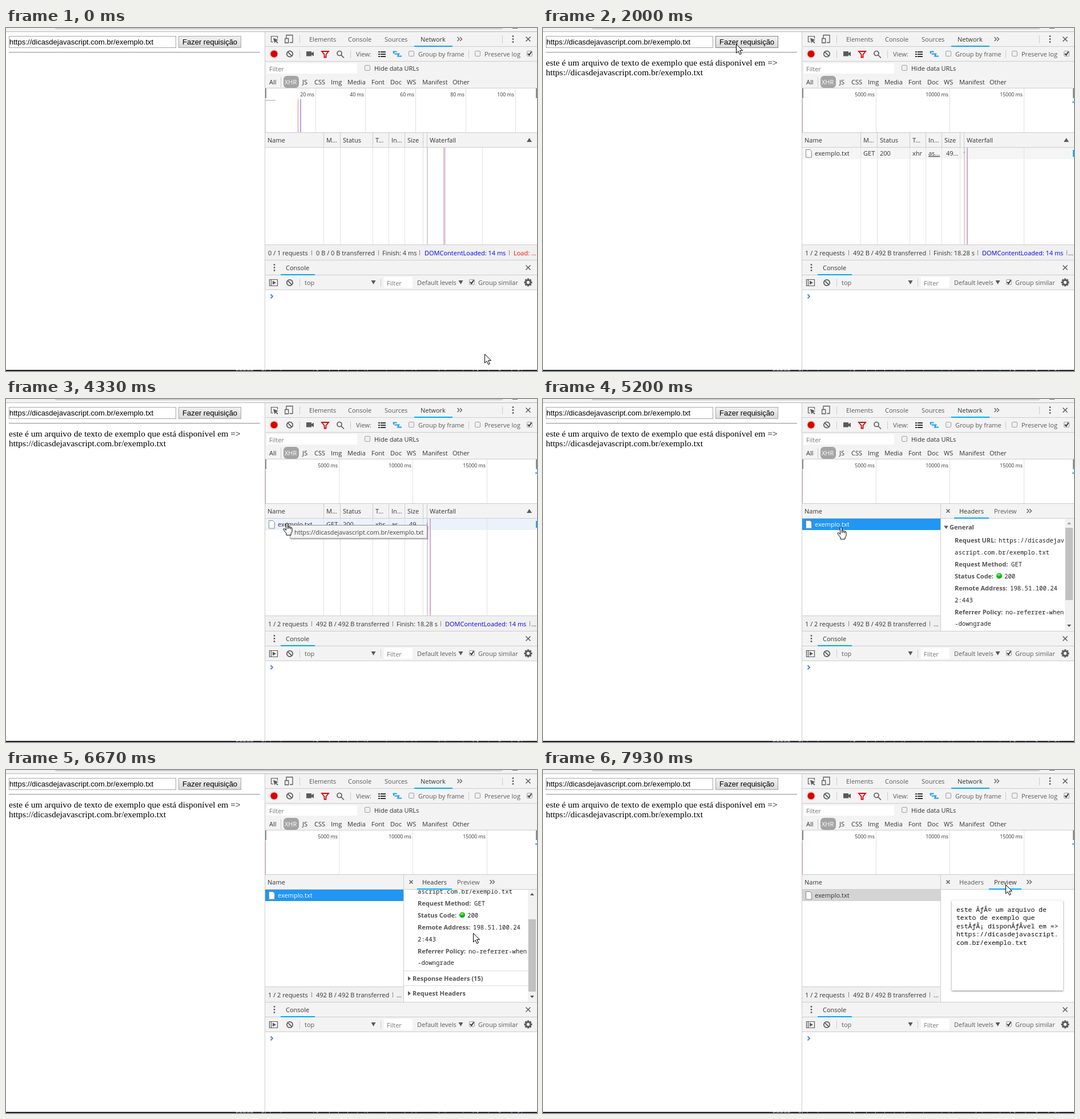
An HTML page that plays this animation: 930x602 px, repeating every 8 s.

```html
<!DOCTYPE html>
<html lang="pt-BR">
<head>
<meta charset="utf-8">
<title>XHR demo</title>
<style>
html, body { margin: 0; height: 100%; overflow: hidden; background: #fff; }
svg { display: block; width: 100vw; height: 100vh; }
text { font: 11px "Open Sans", "Noto Sans", sans-serif; white-space: pre; }
rect { shape-rendering: crispEdges; }
.b { font-weight: 700; }
.s { font-size: 8.8px; }
.tip { font-size: 10.87px; }
.mono { font: 10.65px "Noto Sans Mono", "DejaVu Sans Mono", monospace; }
.pre { font: 11.45px "Noto Sans Mono", "DejaVu Sans Mono", monospace; }
.ui { font: 13px "Liberation Sans", Arial, sans-serif; }
.page { font: 15.5px "Liberation Serif", "Times New Roman", serif; }
.card { filter: drop-shadow(0 1px 1.5px rgba(0, 0, 0, .5)); }
</style>
</head>
<body>
<svg id="stage" viewBox="0 0 930 602"></svg>
<script>
const GREY = '#5a5a5a', DARK = '#333', LINE = '#ccc', BAR = '#f3f3f3', BLUE = '#03a9f4';
const URL_TEXT = 'https://dicasdejavascript.com.br/exemplo.txt';

const text = (x, y, str, fill = DARK, cls = '', extra = '') =>
  `<text x="${x}" y="${y}" fill="${fill}" class="${cls}" ${extra}>${str}</text>`;
const rect = (x, y, w, h, fill, extra = '') =>
  `<rect x="${x}" y="${y}" width="${w}" height="${h}" fill="${fill}" ${extra}/>`;
const shape = (d, fill = GREY, extra = '') => `<path d="${d}" fill="${fill}" ${extra}/>`;
const stroke = (d, color = GREY, width = 1.5) =>
  shape(d, 'none', `stroke="${color}" stroke-width="${width}"`);
const group = (id, ...parts) => `<g id="${id}">${parts.join('')}</g>`;
const vlines = (xs, y, h, fill) => xs.map(x => rect(x, y, 1, h, fill)).join('');
const labels = (y, fill, items) => items.map(([x, str]) => text(x, y, str, fill)).join('');
const cross = (x, y, r) => stroke(`M${x - r} ${y - r}l${2 * r} ${2 * r}m0 ${-2 * r}l${-2 * r} ${2 * r}`);
const chevrons = (x, y) => stroke(`M${x} ${y - 3.5}l3.5 3.5l-3.5 3.5m4.5 -7l3.5 3.5l-3.5 3.5`, GREY, 1.3);
const kebab = (x, y) => [-5, 0, 5].map(d => `<circle cx="${x}" cy="${y + d}" r="1.4" fill="${GREY}"/>`).join('');
const clearIcon = (x, y) => stroke(`M${x - 5.2} ${y}a5.2 5.2 0 1 0 10.4 0a5.2 5.2 0 1 0 -10.4 0M${x - 3.6} ${y - 3.6}l7.2 7.2`, GREY, 1.7);
const checkbox = (x, y, checked) =>
  `<rect x="${x + .5}" y="${y + .5}" width="9" height="9" rx="1.5" fill="#f0f0f0" stroke="#a0a0a0" style="shape-rendering:auto"/>` +
  (checked ? stroke(`M${x + 2} ${y + 5}l2.3 2.5l4 -6`, '#333', 1.9) : '');
const fileIcon = shape('M460.5 213.5h7l3 3v10.5h-10z', '#fff', 'stroke="#8a8a8a"');

function browserPage() {
  return rect(0, 0, 930, 602, '#fff') + rect(0, 0, 930, 6, '#f2f2f2') + rect(0, 6, 930, 1, '#b8b8b8') +
    shape('M86 0q0 1.5 3 1.5h778q3 0 3 -1.5z', '#fff', 'stroke="#bbb"') + rect(887, 0, 9, 1, '#666') +
    rect(5.5, 14.5, 292, 20, '#fff', 'stroke="#a6a6a6"') + text(6, 29, URL_TEXT, '#000', 'ui') +
    rect(302.5, 14.5, 109, 20, 'url(#btn)', 'id="button"') + text(309, 29, 'Fazer requisição', '#000', 'ui') +
    rect(5, 42, 440, 1, '#9a9a9a') + rect(5, 43, 440, 1, '#eee') +
    group('response',
      text(5, 66, 'este é um arquivo de texto de exemplo que está disponível em =>', '#000', 'page'),
      text(5, 83, URL_TEXT, '#000', 'page'));
}

function toolbars() {
  return rect(453, 7, 1, 593, LINE) + rect(454, 7, 476, 98, BAR) +
    [32, 58].map(y => rect(454, y, 476, 1, LINE)).join('') +
    // tab strip
    stroke('M468 24.5h-3.5v-10h11v4', GREY, 1.2) + shape('M468 17.5l9 3.5l-3.6 1.4l3.2 3.4l-1.3 1.3l-3.3 -3.3l-1.5 3.3z') +
    stroke('M491 19v-6.5h11v13h-5M488.7 18.5h6v7.5h-6z', GREY, 1.3) +
    vlines([514, 869], 13, 14, LINE) +
    labels(24, GREY, [[531, 'Elements'], [599, 'Console'], [663, 'Sources']]) + text(726, 24, 'Network') +
    rect(715, 31, 67, 2, BLUE) + chevrons(790.5, 19.5) + kebab(888, 19.5) + cross(914.5, 19.5, 4) +
    // network controls
    '<circle cx="469.5" cy="45.5" r="7.5" fill="#f3c4c4"/><circle cx="469.5" cy="45.5" r="6" fill="#d90000"/>' +
    clearIcon(497, 45.5) + vlines([514, 603, 810], 39, 14, LINE) +
    shape('M526 41h9v3l4 -2.5v8l-4 -2.5v2.5h-9z') +
    stroke('M553 41h12l-4.5 5.5v5h-3v-5z', '#d90000', 1.8) +
    stroke('M580 44.5a4 4 0 1 0 8 0a4 4 0 1 0 -8 0M587 47.5l5 5', GREY, 1.7) +
    text(613, 50, 'View:', GREY) +
    [41, 45, 49].map(y => rect(652, y, 3, 2, DARK) + rect(656, y, 9, 2, DARK)).join('') +
    stroke('M677.5 41.5h7M680.5 45.5h9M685 49.5h8M679 42v3M687 46v3', '#1a9fe8', 2) +
    checkbox(705, 40) + text(722, 50, 'Group by frame', GREY) +
    checkbox(821, 40) + text(838, 50, 'Preserve log', GREY) + checkbox(912, 40, true) +
    // filters
    rect(457, 62, 158, 18, '#fff') + text(461, 76, 'Filter', '#777') +
    checkbox(628, 65) + text(645, 75, 'Hide data URLs') +
    rect(481, 86, 1, 18, LINE) +
    '<rect x="486" y="84" width="27" height="21" rx="6" fill="#a4a4a4" style="shape-rendering:auto"/>' +
    text(488, 99, 'XHR', '#fff') +
    labels(99, DARK, [[461, 'All'], [519, 'JS'], [540, 'CSS'], [569, 'Img'], [598, 'Media'], [640, 'Font'],
      [673, 'Doc'], [702, 'WS'], [729, 'Manifest'], [782, 'Other']]);
}

function overview(xs, names) {
  return rect(454, 105, 476, 1, LINE) + vlines(xs, 106, 77, '#e0e0e0') +
    names.map((name, i) => text(xs[i] - 2, 119.5, name, DARK, 's', 'text-anchor="end"')).join('') +
    rect(454, 106, 2, 17, '#8a8a8a') + rect(928, 106, 2, 17, '#8a8a8a') + rect(454, 123, 1, 60, '#ddd');
}

function footer(width, items, seps) {
  return rect(454, 380, width, 1, LINE) + rect(454, 381, width, 26, '#f0f0f0') + vlines(seps, 390, 9, '#888') +
    items.map(([x, str, fill]) => text(x, 399, str, fill)).join('');
}

const columnLines = [556, 585, 642, 670, 698, 730, 737];

function network() {
  return group('idleOverview',
      overview([542, 629, 717, 805, 892], ['20 ms', '40 ms', '60 ms', '80 ms', '100 ms']),
      rect(454, 126, 18, 2, LINE), rect(511, 125, 1, 58, '#e08080'), rect(515, 125, 2, 58, '#a9a9f5')) +
    group('busyOverview',
      overview([583, 712, 842], ['5000 ms', '10000 ms', '15000 ms']),
      rect(454, 125, 1, 58, '#d8a0a8'), rect(927, 129, 3, 2, BLUE)) +
    rect(454, 183, 476, 27, BAR) + rect(454, 183, 476, 1, LINE) + rect(454, 209, 476, 1, LINE) +
    text(458, 201, 'Name') +
    group('rowBack', rect(454, 210, 476, 20, '#f5f5f5', 'id="rowFill"')) +
    group('columns',
      vlines(columnLines, 184, 25, LINE), vlines(columnLines.slice(0, 6), 210, 170, '#e1e1e1'), rect(737, 210, 2, 170, '#d4d4d4'),
      labels(201, DARK, [[561, 'M...'], [590, 'Status'], [647, 'T...'], [675, 'In...'], [703, 'Size'], [742, 'Waterfall']]),
      shape('M912 200h9l-4.5 -7z')) +
    group('idleTable',
      rect(834, 210, 1, 170, '#e1e1e1'), rect(766, 210, 2, 170, '#f5b5b5'), rect(768, 210, 2, 170, '#d5d5f5'),
      footer(476, [[459, '0 / 1 requests'], [543, '0 B / 0 B transferred'], [659, 'Finish: 4 ms'],
        [733, 'DOMContentLoaded: 14 ms', '#00e'], [889, 'Load: ...', '#f11']], [535, 652, 724, 881])) +
    group('busyTable',
      rect(842, 210, 1, 170, '#e1e1e1'), rect(742, 210, 2, 170, '#d0a8d0'), rect(928, 214, 2, 12, BLUE),
      labels(224, DARK, [[561, 'GET'], [590, '200'], [647, 'xhr'], [706, '49...']]),
      text(675, 224, 'as...', DARK, '', 'text-decoration="underline"'), rect(737, 217, 1, 3, '#888'),
      footer(476, [[459, '1 / 2 requests'], [543, '492 B / 492 B transferred'], [684, 'Finish: 18.28 s'],
        [769, 'DOMContentLoaded: 14 ms', '#00e'], [920, '...']], [535, 677, 761, 917])) +
    group('rowName', fileIcon, text(476, 224, 'exemplo.txt', DARK, '', 'id="rowText"'));
}

function headerPane() {
  const field = (y, name, x, value) => text(721, y, name + ':', '#545454', 'b') + text(x, y, value, '#222', 'mono');
  const rest = (y, value) => text(721, y, value, '#222', 'mono');
  const more = (y, name) => rect(697, y - 18, 217, 1, '#ddd') + shape(`M704 ${y - 8}v8l5 -4z`) + text(712, y, name, '#545454', 'b');
  return group('headers',
    '<g clip-path="url(#paneClip)">', group('headerList',
      shape('M702 222.5h8l-4 5.5z'), text(712, 229, 'General', '#545454', 'b'),
      field(252, 'Request URL', 798, 'https://dicasdejav'), rest(272.5, 'ascript.com.br/exemplo.txt'),
      field(294, 'Request Method', 820, 'GET'), field(315, 'Status Code', 808, '200'),
      '<circle cx="799" cy="310.5" r="5" fill="#12b512"/><ellipse cx="798.5" cy="308.5" rx="3" ry="2" fill="#6be06b"/>',
      field(336, 'Remote Address', 818, '198.51.100.24'), rest(356.5, '2:443'),
      field(377.5, 'Referrer Policy', 810, 'no-referrer-when'), rest(398, '-downgrade'),
      more(426, 'Response Headers (15)'), more(452, 'Request Headers')),
    '</g>',
    rect(914, 210, 16, 196, '#f1f1f1'), shape('M918 220h7l-3.5 -4z', '#505050', 'id="upArrow"'),
    shape('M918 396h7l-3.5 4z', '#505050'), rect(915, 226, 13, 127, '#c1c1c1', 'id="thumb"'));
}

function details() {
  const lines = ['este ÃƒÂ© um arquivo de', 'texto de exemplo que', 'estÃƒÂ¡ disponÃƒÂvel em =>',
    'https://dicasdejavascript.', 'com.br/exemplo.txt'];
  return group('details',
    footer(242, [[459, '1 / 2 requests'], [543, '492 B / 492 B transferred'], [684, '...']], [535, 677]),
    rect(697, 210, 233, 197, '#fff'), rect(696, 184, 1, 223, LINE),
    cross(709.5, 196.5, 3), text(729, 201, 'Headers', GREY, '', 'id="headersTab"'),
    text(790, 201, 'Preview', GREY, '', 'id="previewTab"'), chevrons(847.5, 196.5),
    rect(720, 208, 61, 2, BLUE, 'id="tabLine"'),
    headerPane(),
    group('preview',
      rect(716, 229, 195, 158, '#fff', 'class="card"'),
      lines.map((line, i) => text(724, 248.5 + 14.6 * i, line, '#111', 'pre')).join('')));
}

function consoleDrawer() {
  const teeth = Array.from({ length: 8 }, (_, i) =>
    `<rect x="912.8" y="439.5" width="3.4" height="4" fill="${GREY}" style="shape-rendering:auto" transform="rotate(${45 * i} 914.5 446.5)"/>`);
  return rect(454, 407, 476, 52, BAR) + [407, 433, 459].map(y => rect(454, y, 476, 1, LINE)).join('') +
    kebab(470, 420.5) + text(490, 425, 'Console') + rect(481, 432, 60, 2, BLUE) + cross(914.5, 420.5, 4) +
    stroke('M461.5 441.5h14v11h-14zM464.5 441v11', GREY, 1.2) + shape('M467 443.5v7l6 -3.5z') +
    clearIcon(497, 447) + vlines([514, 656], 440, 14, LINE) +
    text(523, 451, 'top', GREY) + shape('M639.5 443h8l-4 7z') +
    rect(662, 437, 50, 19, '#fff') + text(667, 452, 'Filter', '#777') +
    text(720, 451, 'Default levels', GREY) + shape('M792.5 443h8l-4 7z') +
    checkbox(811, 441, true) + text(827, 451, 'Group similar', GREY) +
    teeth.join('') + stroke('M910.5 446.5a4 4 0 1 0 8 0a4 4 0 1 0 -8 0', GREY, 2.4) +
    stroke('M463.5 467.5l3.5 3.5l-3.5 3.5', '#3b82f0', 1.8) +
    rect(0, 600, 930, 2, '#1e1e1e', 'id="taskbar"') +
    text(402, 608, 'ERROR: Ship is currently docked at the outer station and is not able to load fire', '#aaa', 'mono');
}

const tooltip = group('tooltip',
  rect(499, 223, 241, 24, '#000', 'opacity=".18"'), rect(497.5, 221.5, 240, 23, '#f4f4f4', 'stroke="#8f8f8f"'),
  text(505, 238, URL_TEXT, '#444', 'tip'));

const outline = 'stroke="#000" stroke-linejoin="round"';
const pointers = group('pointer',
  group('arrow', shape('M.5 .5v15.5l3.6 -3.4l2.6 5.9l2.6 -1.1l-2.6 -5.8h4.9z', '#fff', outline)),
  group('beam', stroke('M-3 -7.5h2.5l.5 .5l.5 -.5h2.5M0 -7v14M-3 7.5h2.5l.5 -.5l.5 .5h2.5', '#000', 1)),
  group('hand', shape('M-.5 1.5q1.5 -2 3 0v6q1.5 -1 2.5 .5q1.5 -1 2.5 .5q2 -.5 2.5 1.5v6l-2 3v3h-8v-3l-5 -6.5q-.5 -2.5 2 -1.5l2.5 2.5z', '#fff', outline),
    stroke('M2.5 7v4M5 8v3M7.5 8.5v3', '#000', 1)));

document.getElementById('stage').innerHTML =
  `<defs><linearGradient id="btn" x2="0" y2="1"><stop stop-color="#f2f2f2"/><stop offset="1" stop-color="#d8d8d8"/></linearGradient>
  <clipPath id="paneClip"><rect x="697" y="210" width="217" height="196"/></clipPath></defs>` +
  browserPage() + toolbars() + network() + details() + consoleDrawer() + tooltip + pointers;

const el = Object.fromEntries([...document.querySelectorAll('[id]')].map(node => [node.id, node]));
const show = (name, on) => { el[name].style.display = on ? '' : 'none'; };
const paint = (name, fill) => el[name].setAttribute('fill', fill);

// Pointer legs in ticks: start, end, then cubic control points.
const legs = [
  [0, 13, [838, 572], [1020, 480], [800, 160], [340, 63]],
  [13, 19, [340, 63], [341, 50], [339, 38], [338, 28]],
  [40, 48, [338, 28], [290, 45], [150, 58], [99, 61]],
  [48, 53, [99, 61], [115, 64], [176, 85], [176, 99]],
  [56, 64, [176, 99], [240, 85], [420, 170], [491, 217]],
  [76, 87, [491, 217], [600, 240], [800, 310], [823, 263]],
  [92, 100, [823, 263], [823, 270], [818, 280], [818, 286]],
  [106, 115, [818, 286], [822, 260], [812, 220], [810, 201]]
];

function pointerAt(tick) {
  const [start, end, a, b, c, d] = legs.filter(leg => leg[0] <= tick).pop();
  const p = Math.min(1, (tick - start) / (end - start));
  const u = p * p * (3 - 2 * p), v = 1 - u;
  return [0, 1].map(k => Math.round(v ** 3 * a[k] + 3 * v * v * u * b[k] + 3 * v * u * u * c[k] + u ** 3 * d[k]));
}

function scrollAt(tick) {
  if (tick < 92 || tick >= 106) return 0;
  if (tick > 102) return Math.round(56 * Math.cos((tick - 102) * Math.PI / 8));
  return Math.round(56 * Math.sin(Math.min(1, (tick - 91) / 5) * Math.PI / 2));
}

function render(tick) {
  const answered = tick >= 28, listed = tick >= 30, open = tick >= 71, previewing = tick >= 117;
  const [x, y] = pointerAt(tick);
  const scroll = scrollAt(tick);
  const overRow = listed && x > 454 && x < (open ? 696 : 930) && y >= 210 && y < 231;
  const overText = answered && x < 410 && y > 52 && y < 87;
  const overButton = x >= 302 && x < 412 && y >= 14 && y < 35;

  show('response', answered);
  paint('taskbar', answered ? '#1d232b' : '#1e1e1e');
  el.button.setAttribute('stroke', overButton ? '#808080' : '#a8a8a8');
  show('idleOverview', !listed);
  show('busyOverview', listed);
  show('idleTable', !listed);
  show('busyTable', listed && !open);
  show('columns', !open);
  show('rowBack', listed);
  show('rowName', listed);
  paint('rowFill', previewing ? '#d4d4d4' : open ? '#2196f3' : overRow ? '#ebf2fc' : '#f5f5f5');
  paint('rowText', open && !previewing ? '#fff' : DARK);
  show('details', open);
  show('headers', tick >= 72 && !previewing);
  show('preview', tick >= 118);
  paint('headersTab', previewing ? GREY : DARK);
  paint('previewTab', open && y < 210 && x > 781 && x < 838 ? DARK : GREY);
  el.tabLine.setAttribute('x', previewing ? 781 : 720);
  el.tabLine.setAttribute('width', previewing ? 57 : 61);
  el.headerList.setAttribute('transform', `translate(0 ${-scroll})`);
  el.thumb.setAttribute('y', Math.round(226 + scroll / 1.55));
  paint('upArrow', scroll ? '#505050' : '#a3a3a3');
  show('tooltip', tick >= 65 && !open);
  show('hand', overRow);
  show('beam', overText);
  show('arrow', !overRow && !overText);
  el.pointer.setAttribute('transform', `translate(${x} ${y})`);
}

// The picture advances 15 times a second, 120 ticks per loop.
const origin = performance.now();
function frame() {
  render(Math.floor((performance.now() - origin + 5) * 0.015) % 120);
  requestAnimationFrame(frame);
}
frame();
</script>
</body>
</html>
```
